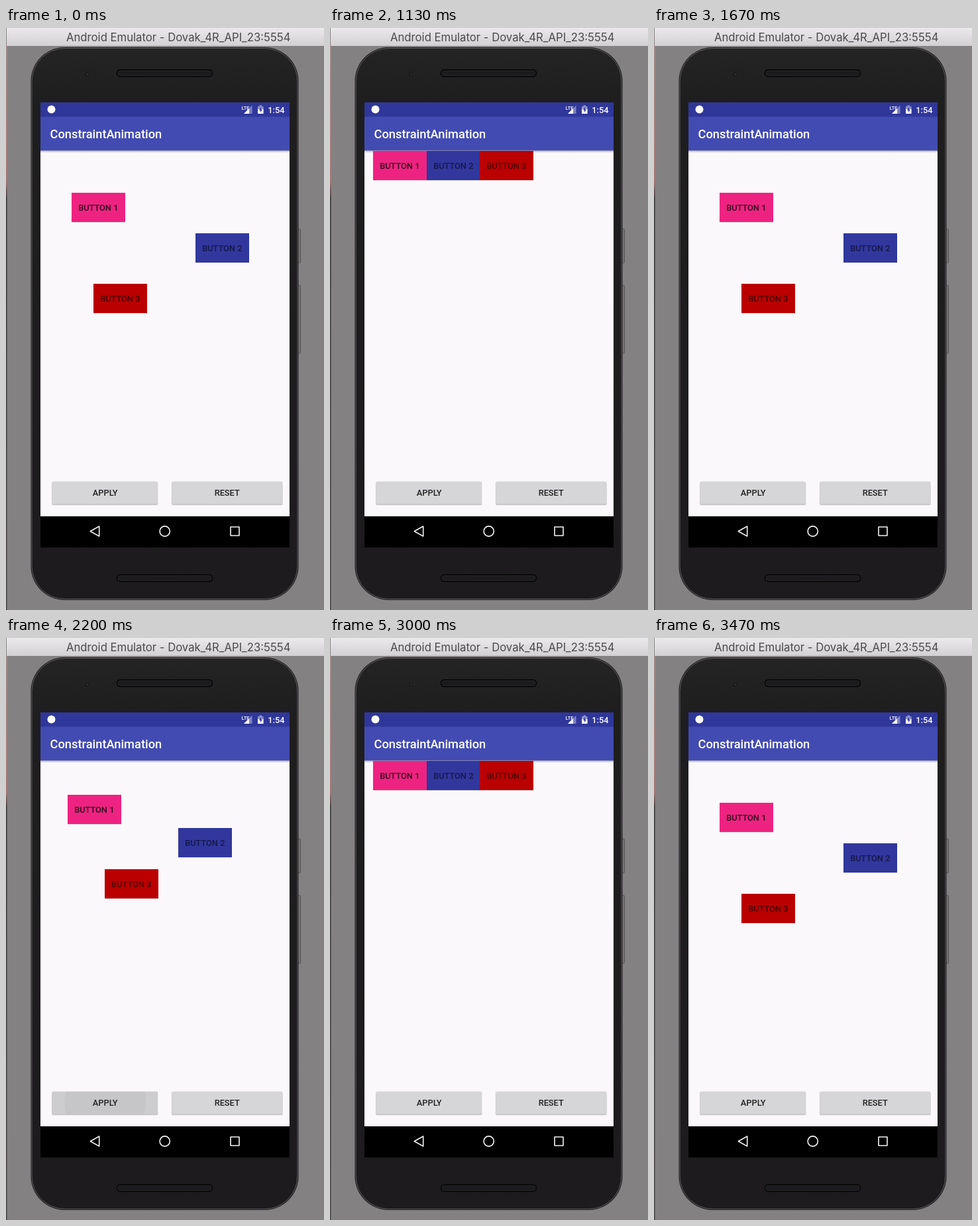
An HTML page that plays this animation: 480x876 px, repeating every 3.54 s.

```html
<!DOCTYPE html>
<html lang="en">
<head>
<meta charset="utf-8">
<title>Constraint animation</title>
<style>
  html, body { margin: 0; width: 100%; height: 100%; overflow: hidden; background: #838182; }
  svg { display: block; width: 100vw; height: 100vh; }
  text { font-family: Roboto, sans-serif; font-weight: 500; }
  .window { font: 400 16.7px Inter, sans-serif; }
  .label { font-size: 12.8px; text-anchor: middle; }
</style>
</head>
<body>
<svg viewBox="0 0 480 876">
  <defs>
    <linearGradient id="bar" x2="0" y2="1">
      <stop stop-color="#ebe9eb"/><stop offset="1" stop-color="#d2d0d2"/>
    </linearGradient>
    <linearGradient id="edge" x2="0" y2="1">
      <stop stop-color="#a98f90"/><stop offset=".24" stop-color="#a77"/>
      <stop offset=".27" stop-color="#333"/><stop offset="1" stop-color="#4a4647"/>
    </linearGradient>
    <linearGradient id="body" x2="0" y2="1">
      <stop stop-color="#252425"/><stop offset=".1" stop-color="#1f1e1f"/>
      <stop offset="1" stop-color="#1d1b1d"/>
    </linearGradient>
    <linearGradient id="shade" x2="0" y2="1">
      <stop stop-color="#000" stop-opacity=".28"/><stop offset="1" stop-color="#000" stop-opacity="0"/>
    </linearGradient>
    <clipPath id="content"><rect x="52" y="184" width="376" height="551"/></clipPath>
  </defs>

  <rect width="480" height="876" fill="#838182"/>
  <rect y="27" width="1.5" height="849" fill="url(#edge)"/>
  <rect x="1" width="479" height="27" fill="url(#bar)"/>
  <text class="window" x="91" y="19.5" fill="#4b494b">Android Emulator - Dovak_4R_API_23:5554</text>

  <!-- handset -->
  <g fill="#767475" stroke="#4c4a4b" stroke-width=".8">
    <rect x="440" y="302.5" width="4.5" height="51" rx="1"/>
    <rect x="440" y="387.5" width="4.5" height="102" rx="1"/>
  </g>
  <rect x="37.5" y="29" width="404" height="832" rx="51" fill="#1a191a"/>
  <rect x="39" y="30.5" width="401" height="829" rx="49.5" fill="url(#body)" stroke="#757375" stroke-width=".8"/>
  <circle cx="122" cy="70" r="2.6" fill="#171618"/>
  <circle cx="122.5" cy="70" r="1" fill="#4a494c"/>
  <g id="speakers"></g>

  <!-- screen -->
  <rect x="52" y="112" width="376" height="670"/>
  <rect x="52" y="184" width="376" height="551" fill="#fbf8fb"/>
  <rect x="52" y="112" width="376" height="22" fill="#30379a"/>
  <rect x="52" y="133.5" width="376" height="51" fill="#424bb1"/>
  <rect x="52" y="184.5" width="376" height="3.5" fill="url(#shade)"/>
  <text x="66.5" y="166" font-size="18.3" fill="#fff">ConstraintAnimation</text>

  <circle cx="68.5" cy="122.5" r="6" fill="#fff"/>
  <text x="355.5" y="122.5" font-size="7.5" fill="#fff">LTE</text>
  <path d="M359 129L371.5 116.5V129Z" fill="#7d82c2"/>
  <path d="M359 129L367 121V129Z" fill="#fff"/>
  <path d="M380 118h2.5v-1.8h3.5V118h2.5v11h-8.5z" fill="#8d91ca"/>
  <path d="M380 122h8.5v7H380z" fill="#fff"/>
  <path d="M385 118.8l-3 5h1.9v3.8l3-5H385z" fill="#30379a"/>
  <text x="420.5" y="127.5" font-size="12.8" fill="#fff" text-anchor="end">1:54</text>

  <g fill="none" stroke="#f4f4f4" stroke-width="1.6" stroke-linejoin="round">
    <path d="M127.3 757.5L140.7 750V765Z"/>
    <circle cx="239.7" cy="757.5" r="7.6"/>
    <rect x="339" y="751" width="13" height="13"/>
  </g>

  <g id="controls"></g>
  <g id="boxes" clip-path="url(#content)"></g>
</svg>
<script>
const LOOP = 3540, STEP = 1000 / 15, MOVE = 320;
const NS = 'http://www.w3.org/2000/svg';
const byId = id => document.getElementById(id);

function add(parent, tag, attrs, text) {
  const el = document.createElementNS(NS, tag);
  for (const k in attrs) el.setAttribute(k, attrs[k]);
  if (text) el.textContent = text;
  parent.appendChild(el);
  return el;
}

for (const y of [62, 822]) {
  const g = byId('speakers');
  add(g, 'rect', { x: 166.5, y, width: 146, height: 12, rx: 6, fill: '#0a0a0a' });
  add(g, 'rect', { x: 169, y: y + 2.5, width: 141, height: 7, rx: 3.5, fill: '#1b1a1c', stroke: '#2f2e30', 'stroke-width': .8 });
}

function control(x, width, label, cx) {
  const g = byId('controls'), id = 'clip' + label;
  const box = { x, y: 682.5, width, height: 34, rx: 2 };
  add(add(g, 'clipPath', { id }), 'rect', box);
  add(g, 'rect', { ...box, x: x - .6, y: 683.5, width: width + 1.2, height: 35, opacity: .1 });
  add(g, 'rect', { ...box, y: 683.5, height: 34.3, opacity: .15 });
  add(g, 'rect', { ...box, fill: '#d6d5d7' });
  const tint = add(g, 'rect', { ...box, opacity: 0 });
  const ripple = add(g, 'circle', { cx, cy: 699, r: 0, opacity: 0, 'clip-path': `url(#${id})` });
  add(g, 'text', { class: 'label', x: cx, y: 704, fill: '#212121' }, label);
  return { tint, ripple };
}

const controls = [control(69.5, 159.5, 'APPLY', 149.7), control(250.3, 167, 'RESET', 333.7)];

const boxes = [
  { from: [99, 248], to: [65, 185], fill: '#ee2381', ink: '#320c1f' },
  { from: [286, 309], to: [146, 185], fill: '#31379d', ink: '#16184a' },
  { from: [132, 385], to: [226, 185], fill: '#ba0000', ink: '#4c0000' }
].map((b, i) => {
  const el = add(byId('boxes'), 'g', {});
  add(el, 'rect', { y: 1, width: 81, height: 44, opacity: .12 });
  add(el, 'rect', { width: 81, height: 44, fill: b.fill });
  add(el, 'text', { class: 'label', x: 40.3, y: 26.7, fill: b.ink }, 'BUTTON ' + (i + 1));
  return { ...b, el };
});

// which: 0 = apply, 1 = reset; tint darkens the whole control
const taps = [
  { at: 300, which: 0, tint: .045, speed: .4 },
  { at: 1220, which: 1, tint: 0, speed: .165 },
  { at: 2110, which: 0, tint: .045, speed: .4 },
  { at: 3008, which: 1, tint: 0, speed: .165 }
];

const clamp = v => Math.max(0, Math.min(1, v));
const ease = v => (1 - Math.cos(Math.PI * clamp(v))) / 2;

function draw(ms) {
  const t = Math.min(52, Math.floor((ms + 5) / STEP)) * STEP;
  let p = 0;
  const glow = [{ tint: 0, r: 0, a: 0 }, { tint: 0, r: 0, a: 0 }];
  for (const tap of taps) {
    const age = t - tap.at;
    if (age >= 0) {
      const e = ease(age / MOVE);
      p = tap.which ? 1 - e : e;
    }
    if (age > -64 && age < 400) {
      const fade = clamp((age + 64) / 100) * clamp((400 - age) / 200);
      glow[tap.which] = { tint: tap.tint * fade, r: (age + 64) * tap.speed, a: .035 * fade };
    }
  }
  for (const { el, from, to } of boxes) {
    const [x, y] = from.map((v, i) => Math.round(v + (to[i] - v) * p));
    el.setAttribute('transform', `translate(${x} ${y})`);
  }
  controls.forEach(({ tint, ripple }, i) => {
    tint.setAttribute('opacity', glow[i].tint);
    ripple.setAttribute('r', glow[i].r);
    ripple.setAttribute('opacity', glow[i].a);
  });
}

const start = performance.now();
function tick() {
  draw((performance.now() - start) % LOOP);
  requestAnimationFrame(tick);
}
tick();
</script>
</body>
</html>
```
